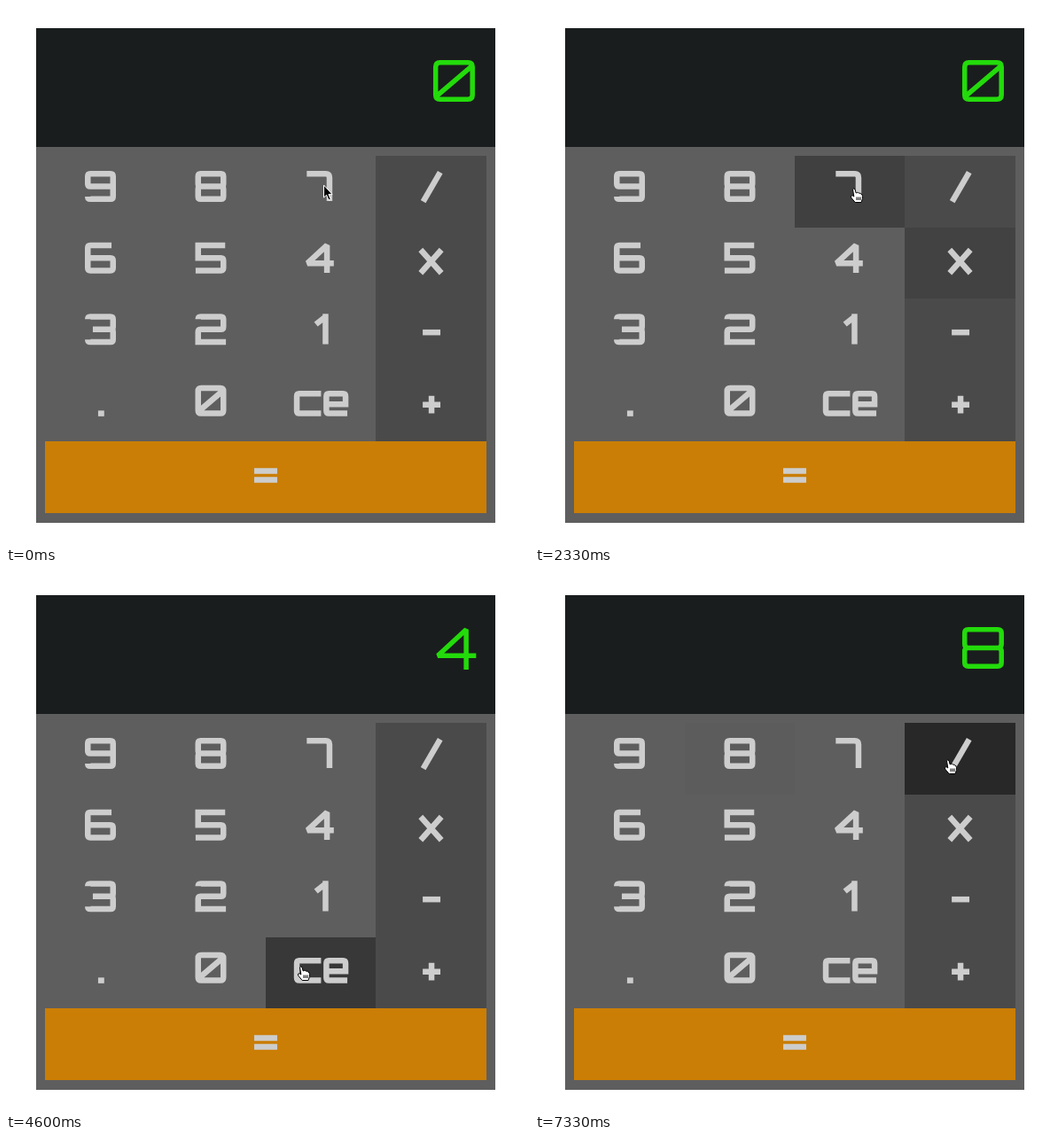
Animation, 590 px wide and 608 px high, one loop 8000 ms. Source, as an HTML page with a canvas:

```html
<!DOCTYPE html>
<html lang="en">
<head>
<meta charset="utf-8">
<title>Calculator</title>
<style>
html, body { margin: 0; width: 100%; height: 100%; overflow: hidden; background: #fff; }
canvas { display: block; }
</style>
</head>
<body>
<canvas id="stage" width="590" height="608"></canvas>
<script>
const ctx = document.getElementById('stage').getContext('2d');

// Glyph centre lines on a 10 x 10 grid
const glyphs = {
  0: 'M1.2 0H8.8Q10 0 10 1.2V8.8Q10 10 8.8 10H1.2Q0 10 0 8.8V1.2Q0 0 1.2 0ZM.4 9L9.6 1.2',
  1: 'M6 10.9V-1.1M2.2 3L6 0',
  2: 'M0 1Q0 0 1 0H9Q10 0 10 1V4Q10 5 9 5H1Q0 5 0 6V10H11',
  3: 'M0 1Q0 0 1 0H9Q10 0 10 1V4Q10 5 9 5H2M9 5Q10 5 10 6V9Q10 10 9 10H1Q0 10 0 9',
  4: 'M8.3 10.9V0L.6 7.1H11',
  5: 'M10.7 0H0V5H9Q10 5 10 6V9Q10 10 9 10H-1',
  6: 'M9.4 0H1Q0 0 0 1V9Q0 10 1 10H9Q10 10 10 9V6Q10 5 9 5H0',
  7: 'M1 0H8.5Q10 0 10 1.5V10.8',
  8: 'M1 0H9Q10 0 10 1V4Q10 5 9 5H1Q0 5 0 4V1Q0 0 1 0ZM1 5H9Q10 5 10 6V9Q10 10 9 10H1Q0 10 0 9V6Q0 5 1 5Z',
  9: 'M10 5H1Q0 5 0 4V1Q0 0 1 0H9Q10 0 10 1V9Q10 10 9 10H1Q0 10 0 9',
  '/': 'M1.9 11L8.6-.6',
  x: 'M.9 1.8L9.1 11M9.1 1.8L.9 11',
  '-': 'M1.7 6.2H8.7',
  '+': 'M1.7 6.5H8.7M5.2 3V10',
  '.': 'M4.1 10H6.5',
  '=': 'M.45 4.5H9.55M.45 8H9.55',
  ce: 'M9.6 2.2H1Q0 2.2 0 3.2V9Q0 10 1 10H9.6M11.7 6.4H19.3V3.2Q19.3 2.2 18.3 2.2H12.7Q11.7 2.2 11.7 3.2V9Q11.7 10 12.7 10H20'
};
const nudge = { 4: -2.3, 7: -4.3, 1: 2.6, ce: -12.7 };
const cols = [44, 169, 293, 417, 542];
const rows = [169, 250, 330, 411, 491, 572];
const labels = ['9', '8', '7', '/', '6', '5', '4', 'x', '3', '2', '1', '-', '.', '0', 'ce', '+', '='];

const display = [[0, '0'], [870, '7'], [1730, '0'], [2600, '7'], [3470, '49'],
  [4600, '4'], [4800, '0'], [5930, '8'], [7330, '0']];

// Pointer moves: start, end, x, y
const moves = [[0, 0, 358, 202], [0, 70, 359, 203], [600, 730, 371, 208], [1200, 1400, 471, 275],
  [1400, 1470, 472, 279], [1870, 2130, 360, 206], [2740, 3060, 265, 543],
  [3870, 4130, 333, 444], [5340, 5600, 232, 208], [6800, 7070, 466, 211]];

// Hovered spans: key, enter, leave
const hovers = [['7', 70, 1300], ['x', 1300, 2020], ['7', 2020, 2870], ['4', 2870, 2900],
  ['1', 2900, 2935], ['ce', 2935, 2970], ['=', 2970, 4000], ['ce', 4000, 5440],
  ['5', 5470, 5500], ['8', 5500, 6920], ['7', 6920, 6960], ['/', 6960, 8000]];

const arrow = new Path2D('M.5 0V14L3.6 11.2L6 17L8.3 16L5.9 10.4H10Z');
const hand = new Path2D('M-1.5 .8Q-.2-1 1 .8L2.2 5L3.3 4.4Q5 4 5.4 5.2Q7.4 4.5 7.8 6.2Q9.5 6 9.4 8.5V11.5L8 15.5H1.2L-2.8 10.8Q-4.5 8.5-3 7.8Q-1.6 7.6-.2 9Z');
const fingers = new Path2D('M3 9.5V13M5 9.5V13M7 9.5V13');

const clamp = v => Math.max(0, Math.min(1, v));
const mix = (a, b, k) => a + (b - a) * k;
const smooth = v => (v = clamp(v)) * v * (3 - 2 * v);

// CSS "ease" curve, solved by bisection
function ease(v) {
  v = clamp(v);
  let lo = 0, hi = 1, s = .5;
  for (let i = 0; i < 16; i++) {
    s = (lo + hi) / 2;
    if (.75 * s * (1 - s) + s ** 3 < v) lo = s; else hi = s;
  }
  return .3 * s * (1 - s) ** 2 + 3 * s * s * (1 - s) + s ** 3;
}

function glow(label, t) {
  let best = 0;
  for (const [key, enter, leave] of hovers) {
    if (key !== label || t < enter) continue;
    const peak = ease((Math.min(t, leave) - enter) / 500);
    best = Math.max(best, peak * (1 - ease((t - leave) / 500)));
  }
  return best;
}

function rect(color, x, y, right, bottom) {
  ctx.fillStyle = color;
  ctx.fillRect(x, y, right - x, bottom - y);
}

function drawGlyph(label, x, y, scale, weight, color) {
  const path = new Path2D();
  path.addPath(new Path2D(glyphs[label]), new DOMMatrix([scale, 0, 0, scale, x, y]));
  ctx.lineWidth = weight;
  ctx.strokeStyle = color;
  ctx.stroke(path);
}

function drawKey(label, i, t) {
  const row = i >> 2, col = i % 4, wide = label === '=';
  const left = cols[col], right = wide ? cols[4] : cols[col + 1];
  const [from, to] = wide ? [[202, 126, 5], [163, 98, 7]]
    : col === 3 ? [[74, 74, 74], [36, 36, 36]] : [[94, 94, 94], [56, 56, 56]];
  const k = glow(label, t);
  rect(`rgb(${from.map((c, j) => Math.round(mix(c, to[j], k)))})`, left, rows[row], right, rows[row + 1]);
  drawGlyph(label, (left + right) / 2 - 14.25 + (nudge[label] || 0), 189.3 + row * 80.6, 2.85, 6.5, '#cdcdcd');
}

function drawPointer(t) {
  let x = 0, y = 0;
  for (const [start, end, toX, toY] of moves) {
    if (t < start) break;
    const k = end > start ? smooth((t - start) / (end - start)) : 1;
    x = mix(x, toX, k);
    y = mix(y, toY, k);
  }
  const early = t < 70;
  ctx.save();
  ctx.translate(Math.round(x), Math.round(y));
  ctx.lineWidth = 1;
  ctx.fillStyle = early ? '#000' : '#fff';
  ctx.strokeStyle = early ? '#fff' : '#000';
  ctx.fill(early ? arrow : hand);
  ctx.stroke(early ? arrow : hand);
  if (!early) ctx.stroke(fingers);
  ctx.restore();
}

function draw(t) {
  rect('#fff', 0, 0, 590, 608);
  rect('#5e5e5e', 34, 25, 552, 583);
  rect('#1a1d1d', 34, 25, 552, 159);
  ctx.miterLimit = 2;
  labels.forEach((label, i) => drawKey(label, i, t));
  const text = display.filter(([at]) => t >= at).pop()[1];
  [...text].reverse().forEach((digit, i) =>
    drawGlyph(digit, 484.7 - i * 53, 63.7, 4.15, 5.5, '#23db0b'));
  drawPointer(t);
}

function tick() {
  const step = Math.floor(performance.now() % 8000 * .015 + .02);
  draw(Math.round(step / .15) * 10);
  requestAnimationFrame(tick);
}
tick();
</script>
</body>
</html>
```
